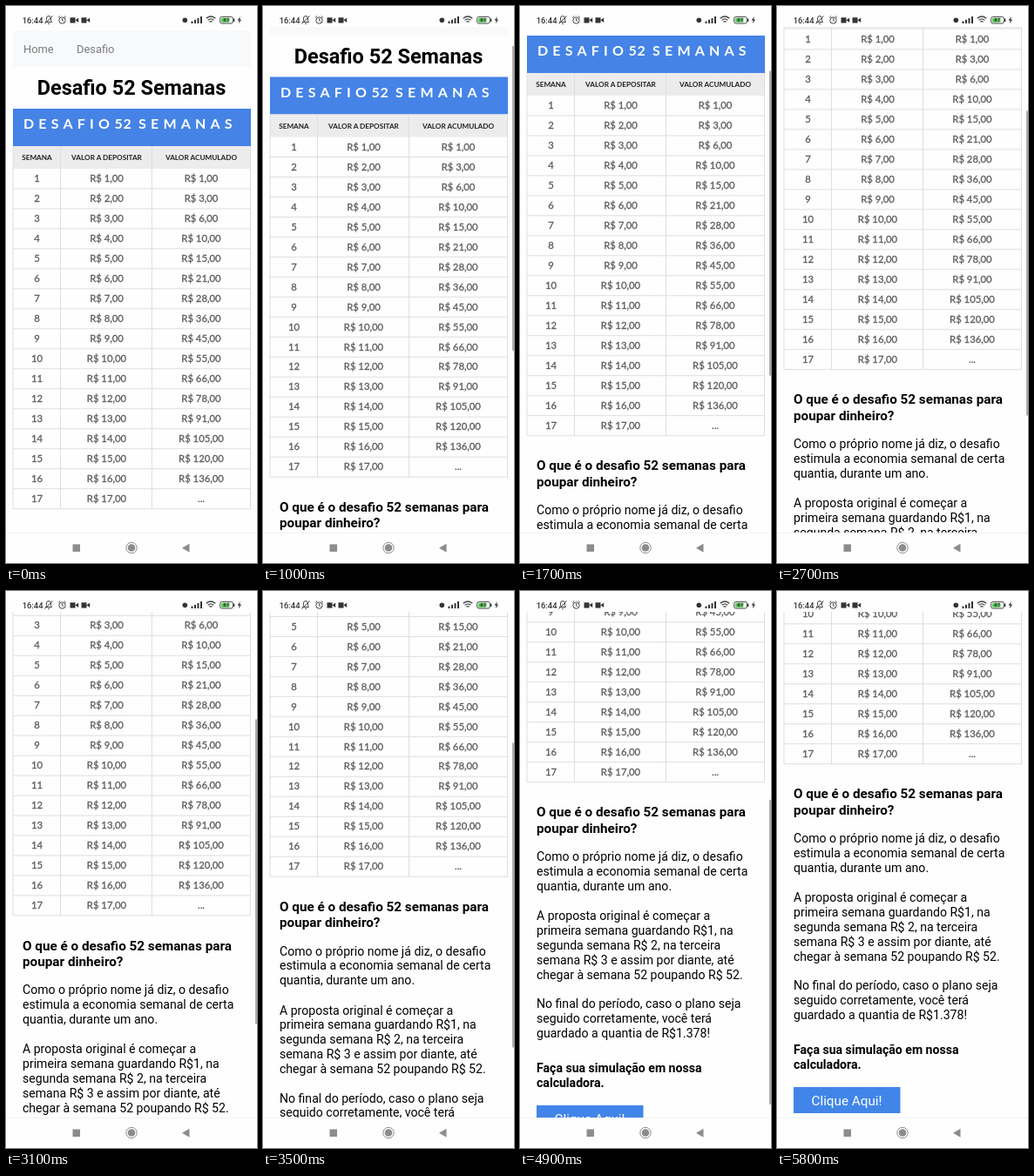
These frames come from a looping animation (288 by 640 pixels, 5900 ms). An HTML page:

```html
<!DOCTYPE html>
<html lang="pt-BR">
<head>
<meta charset="utf-8">
<title>Desafio 52 Semanas</title>
<style>
html, body { margin: 0; width: 100%; height: 100%; overflow: hidden; background: #fefefe; }
svg { display: block; font-family: Roboto, sans-serif; }
.b { font-weight: 700; }
.m { text-anchor: middle; }
.nav { font-size: 12.9px; fill: #7b7c7d; }
.title { font-size: 23.46px; }
.band { font: 700 16px Lato, sans-serif; letter-spacing: 5.2px; fill: #fff; }
.head { font: 700 8.2px Lato, sans-serif; fill: #222; }
.cell { font: 11.3px Lato, sans-serif; fill: #5c5c5c; stroke: #5c5c5c; stroke-width: .3px; }
.h { font-size: 15.25px; }
.p { font-size: 14.08px; }
.btn { font-size: 15.25px; fill: #fff; }
</style>
</head>
<body>
<svg width="288" height="640" viewBox="0 0 288 640">
  <clipPath id="view"><rect y="24" width="288" height="581.5"/></clipPath>
  <rect width="288" height="640" fill="#fefefe"/>
  <g clip-path="url(#view)">
    <g id="page"></g>
    <rect id="thumb" x="286" width="2" height="350" fill="#ababab"/>
  </g>

  <!-- status bar -->
  <text x="18.7" y="19.6" font-size="9.4" font-weight="500" fill="#333">16:44</text>
  <g fill="none" stroke="#444" stroke-width="1">
    <path d="M45.5 18.5h7l-1-2v-2.500a2.500 2.500 0 0 0-5 0v2.500zM44.500 20.500l9-9M48 20.300h2"/>
    <circle cx="64.500" cy="16.500" r="3.700"/>
    <path d="M64.500 14.200v2.500l1.700 1M60.200 13.200l2-1.700M68.800 13.200l-2-1.700"/>
    <path d="M229.700 14.200q5.300-4.400 10.600 0M231.600 16.300q3.400-2.800 6.800 0M233.400 18.300q1.600-1.200 3.200 0" stroke-width="1.300"/>
    <rect x="245.700" y="12.400" width="14.600" height="7.600" rx="2"/>
  </g>
  <g fill="#333">
    <path d="M73.500 13.200h6v6.200h-6zM79.500 16.300l3.700-2.700v5.400zM86.500 13.200h6v6.200h-6zM92.500 16.300l3.700-2.700v5.400z"/>
    <circle cx="205.300" cy="16.200" r="2.800"/>
    <path d="M212.500 17.500h2v2.500h-2zM216 15.800h2v4.200h-2zM219.500 14h2v6h-2zM223 12h2v8h-2zM261 14.500h1.300v3.400h-1.300zM268.800 12l-3.200 4.600h2l-.7 3.600 3.200-4.800h-2z"/>
  </g>
  <rect x="247" y="13.700" width="9.500" height="5" rx=".8" fill="#55cc55"/>
  <text class="m b" x="252.800" y="18.400" font-size="6" fill="#333">87</text>

  <!-- system buttons -->
  <path d="M0 605.500H288" stroke="#f1f1f1"/>
  <g fill="#8c8c8c">
    <rect x="76.500" y="618.500" width="8.500" height="8.500"/>
    <circle cx="144" cy="622.500" r="4.300"/>
    <circle cx="144" cy="622.500" r="6.200" fill="none" stroke="#8c8c8c"/>
    <path d="M202 622.700l8.500-5v10z"/>
  </g>
</svg>
<script>
const page = document.getElementById('page');
const thumb = document.getElementById('thumb');

const text = (cls, x, y, str) => `<text class="${cls}" x="${x}" y="${y}">${str}</text>`;
const box = (x, y, w, h, fill) => `<rect x="${x}" y="${y}" width="${w}" height="${h}" fill="${fill}"/>`;
const lines = (cls, y, step, list) => list.map((s, i) => text(cls, 19, y + i * step, s)).join('');

const COLS = [35.5, 115.5, 224];
const ROWS = 17, ROW_H = 22.98, TOP = 187;

function buildTable() {
  let out = box(8, 118, 273, 43, '#4583e6') +
    text('band', 20, 141, 'DESAFIO') +
    `<text class="band" x="124.500" y="141" style="letter-spacing:.8px">52</text>` +
    text('band', 152, 141, 'SEMANAS') +
    box(8, 161, 273, 26, '#ececec');
  ['SEMANA', 'VALOR A DEPOSITAR', 'VALOR ACUMULADO'].forEach((s, i) => {
    out += text('head m', COLS[i], 177, s);
  });
  let grid = '';
  for (let n = 1; n <= ROWS; n++) {
    const y = TOP + (n - 1) * ROW_H;
    const total = n < ROWS ? `R$ ${n * (n + 1) / 2},00` : '...';
    [n, `R$ ${n},00`, total].forEach((s, i) => {
      out += text('cell m', COLS[i], y + 15.2, s);
    });
    grid += `M8 ${y + ROW_H}H281`;
  }
  for (const x of [8, 62.5, 167.5, 280.5]) grid += `M${x} 161V${TOP + ROWS * ROW_H}`;
  return out + `<path d="${grid}" stroke="#dedede" fill="none"/>`;
}

page.innerHTML =
  box(8, 28, 273, 42, '#f8f9fa') +
  text('nav', 20, 54, 'Home') + text('nav', 81, 54, 'Desafio') +
  text('title b m', 144, 102, 'Desafio 52 Semanas') +
  buildTable() +
  lines('h b', 617.3, 18.2, ['O que é o desafio 52 semanas para', 'poupar dinheiro?']) +
  lines('p', 668, 16.9, ['Como o próprio nome já diz, o desafio',
    'estimula a economia semanal de certa', 'quantia, durante um ano.']) +
  lines('p', 736, 16.9, ['A proposta original é começar a',
    'primeira semana guardando R$1, na', 'segunda semana R$ 2, na terceira',
    'semana R$ 3 e assim por diante, até', 'chegar à semana 52 poupando R$ 52.']) +
  lines('p', 837, 16.9, ['No final do período, caso o plano seja',
    'seguido corretamente, você terá', 'guardado a quantia de R$1.378!']) +
  lines('p b', 911, 16.9, ['Faça sua simulação em nossa', 'calculadora.']) +
  box(19, 949, 122.5, 30, '#4285e8') +
  text('btn m', 80, 969.5, 'Clique Aqui!');

// [time in ms, scroll offset]
const PATH = [[0, 0], [620, 0], [1000, 36.5], [1700, 84], [2700, 160],
  [3500, 249.5], [4900, 358], [5350, 379], [5900, 379]];

function scrollAt(t) {
  const i = PATH.findIndex(p => p[0] > t);
  const [t0, s0] = PATH[i - 1], [t1, s1] = PATH[i];
  return s0 + (s1 - s0) * (t - t0) / (t1 - t0);
}

function draw(now) {
  const t = Math.floor(now % 5900 / 100) * 100;
  const s = scrollAt(t);
  page.setAttribute('transform', `translate(0 ${-s})`);
  thumb.setAttribute('y', 24 + s * 0.603);
  thumb.setAttribute('opacity', t < 700 ? 0 : Math.max(0, Math.min(1, (5750 - t) / 300)));
  requestAnimationFrame(() => draw(performance.now()));
}
draw(performance.now());
</script>
</body>
</html>
```
